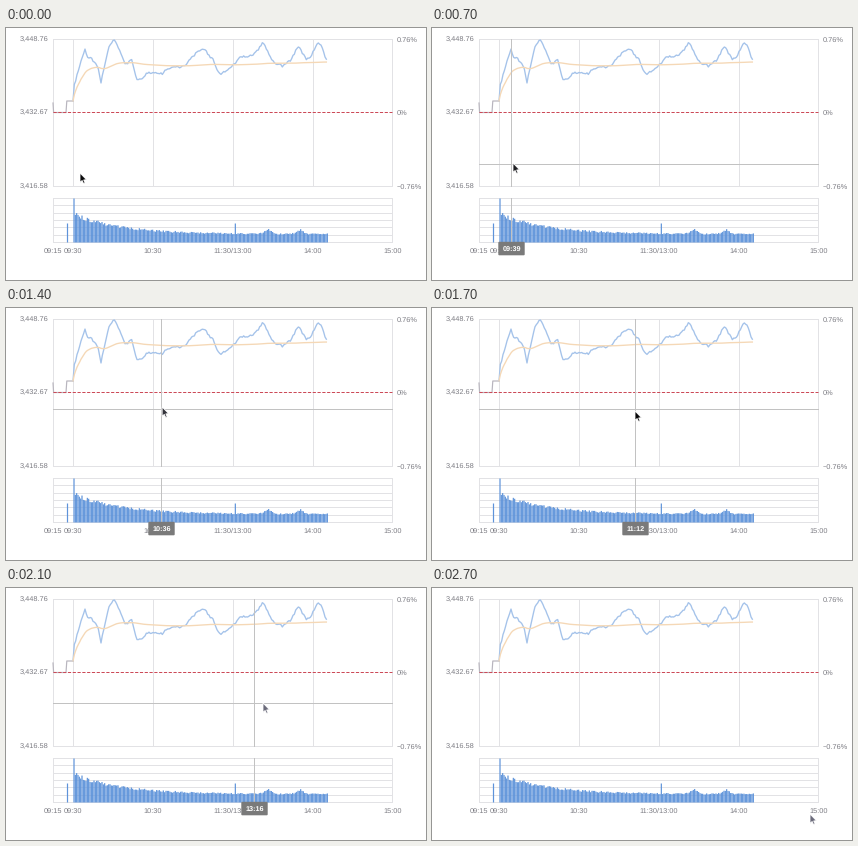
Recreate the animation shown at these times as a matplotlib script. Size 420x252 px, loop 2.8 s.

```python
import matplotlib.pyplot as plt
import numpy as np
from matplotlib.animation import FuncAnimation
from matplotlib.patches import FancyBboxPatch, Polygon

W, H, DPI = 420, 252, 100
PX = 72 / DPI                      # points per pixel
FRAMES, STEP = 28, 100
LEFT, RIGHT = 47.5, 386.5
TOP, MID, BOTTOM = 11.5, 84.5, 158.5
VOL_TOP, VOL_BOTTOM = 170.5, 214.5
OPEN, LAST = 67, 320
MINUTE = 4 / 3                     # pixels per trading minute
GRID, TEXT, CROSS = "#e2e2e5", "#7b7b82", "#c2c2c2"

plt.rcParams["font.family"] = "Liberation Sans"
plt.rcParams["text.hinting"] = "none"
fig = plt.figure(figsize=(W / DPI, H / DPI), dpi=DPI, facecolor="white")
ax = fig.add_axes([0, 0, 1, 1])
ax.set_xlim(0, W)
ax.set_ylim(H, 0)
ax.axis("off")


def line(xs, ys, color, width=1.0, **kw):
    return ax.plot(xs, ys, color=color, lw=width * PX, snap=False, **kw)[0]


def label(x, y, s, align="center", **kw):
    style = dict(color=TEXT, fontsize=7.4 * PX, zorder=5) | kw
    return ax.text(x, y, s, ha=align, va="center_baseline", **style)


def draw_grid():
    rows = np.floor(np.linspace(VOL_TOP, VOL_BOTTOM, 7)) + 0.5
    for y in (TOP, BOTTOM, *rows):
        line([LEFT, RIGHT], [y, y], GRID, zorder=1)
    for x in (LEFT, 67.5, 147.5, 227.5, 307.5, RIGHT):
        line([x, x], [TOP, BOTTOM], GRID, zorder=1)
    for x in (LEFT, RIGHT):
        line([x, x], [VOL_TOP, VOL_BOTTOM], GRID, zorder=1)
    for y, price, change in ((TOP, "3,448.76", "0.76%"),
                             (MID, "3,432.67", "0%"),
                             (BOTTOM, "3,416.58", "\u22120.76%")):
        label(42.2, y - 0.6, price, "right")
        label(391, y - 0.6, change, "left")
    for x, clock in ((47, "09:15"), (67, "09:30"), (147, "10:30"),
                     (227, "11:30/13:00"), (307, "14:00"), (386.5, "15:00")):
        label(x, 222.4, clock)


def volumes(xs, rng):
    """Opening rush that decays, two later swells and a reopening spike."""
    swell = sum(4 * np.exp(-((xs - c) / 5) ** 2) for c in (261, 293))
    bars = (8.5 + 20 * np.exp(-(xs - OPEN) / 46) + swell)
    bars *= rng.uniform(0.9, 1.08, len(xs))
    bars[0] = VOL_BOTTOM - VOL_TOP
    bars[np.abs(xs - 228).argmin()] = 19
    return bars


def prices(xs, rng):
    """Main turning points joined by a seeded jitter."""
    turns = np.array([
        (67, 73), (68, 58), (74, 36), (79, 22), (82, 31), (85, 30), (92, 39),
        (95, 54), (103, 19), (108, 11), (120, 37), (125, 30), (131, 52),
        (136, 51), (141, 45), (157, 46), (160, 41), (178, 38), (193, 22),
        (198, 21), (207, 32), (214, 47), (226, 38), (234, 30), (249, 26),
        (257, 14), (268, 35), (277, 38), (285, 32), (292, 18), (300, 31),
        (305, 28), (312, 15), (315, 16), (320, 31)])
    ys = np.interp(xs, *turns.T)
    ys[1:] += rng.uniform(-1.2, 1.2, len(xs) - 1)
    return np.maximum(ys, TOP - 0.5)


def draw_market(rng):
    xs = np.arange(OPEN, LAST + 0.5, MINUTE)
    ys, bars = prices(xs, rng), volumes(xs, rng)
    mean = np.cumsum(ys * bars) / np.cumsum(bars)

    line([47, 47.6, 60, 60.8, OPEN], [75, MID, MID, 73, 73], "#b8b5be", 1.2,
         zorder=3)
    line(xs, ys, "#a5c3ea", 1.35, zorder=3)
    line(xs, mean, "#f5d8b6", 1.35, zorder=3)
    line([LEFT, RIGHT], [MID, MID], "#cc4a58", dashes=(3.2, 1.6), zorder=4)

    xs, bars = np.append(xs + 1, 61.5), np.append(bars, 19)
    ax.vlines(xs, VOL_BOTTOM - bars, VOL_BOTTOM, color="#5e93da",
              lw=1.2 * PX, zorder=2, snap=False)


def glide(t, keys):
    """Smooth values through timed keys, never overshooting them."""
    ts, *tracks = np.array(keys, float).T
    i = int(np.clip(np.searchsorted(ts, t, "right") - 1, 0, len(ts) - 2))
    d = ts[i + 1] - ts[i]
    u = (t - ts[i]) / d
    out = []
    for v in tracks:
        slope = np.diff(v) / np.diff(ts)
        m = np.gradient(v, ts)
        m[1:-1][slope[:-1] * slope[1:] <= 0] = 0
        out.append((1 + 2 * u) * (1 - u) ** 2 * v[i]
                   + u * (1 - u) ** 2 * d * m[i]
                   + u * u * (3 - 2 * u) * v[i + 1]
                   + u * u * (u - 1) * d * m[i + 1])
    return out


def clock(minute):
    total = 555 + minute if minute <= 135 else 780 + minute - 135
    return f"{total // 60:02d}:{total % 60:02d}"


# time, pointer x and y, trailing crosshair x and y, pointer shade
PATH = [(0, 74, 145, 76, 145, 0.04), (400, 51, 148, 51, 148.5, 0.03),
        (700, 81, 135, 79, 136, 0.12), (1100, 114, 98, 111, 101, 0.38),
        (1700, 203, 103, 203, 101, 0.03), (2100, 257, 115, 248.3, 115, 0.42),
        (2700, 378, 226, 372, 218, 0.42)]
ARROW = 1.12 * np.array([(0, 0), (0, 8.4), (1.9, 6.7), (3.2, 9.5),
                         (4.5, 8.9), (3.3, 6.2), (5.9, 6.1)])

draw_grid()
draw_market(np.random.default_rng(8))

cross_h = line([], [], CROSS, zorder=6)
cross_v = [line([], [], CROSS, zorder=6) for _ in range(2)]
tag = FancyBboxPatch((0, 0), 1, 1, boxstyle="round,pad=0,rounding_size=1",
                     fc="#7a7a7a", ec="none", zorder=7)
ax.add_patch(tag)
tag_text = label(0, 220.4, "", color="white", weight="bold", zorder=8,
                 fontsize=7.3 * PX)
pointer = Polygon(ARROW, closed=True, ec="white", lw=0.8 * PX, zorder=9,
                  joinstyle="round")
ax.add_patch(pointer)


def update(frame):
    px, py, x, y, shade = glide(frame * STEP, PATH)
    pointer.set_xy(ARROW + (px, py))
    pointer.set_facecolor((shade, shade, shade * 1.15))

    shown = 0 < frame < FRAMES - 1
    for part in (cross_h, *cross_v, tag, tag_text):
        part.set_visible(shown)
    if shown:
        minute = round((x - 47) / MINUTE)
        x = round(47 + minute * MINUTE) + 0.5
        y = np.floor(y) + 0.5
        cross_h.set_data([LEFT, RIGHT], [y, y])
        cross_h.set_visible(y <= BOTTOM or VOL_TOP <= y <= VOL_BOTTOM)
        cross_v[0].set_data([x, x], [TOP, BOTTOM])
        cross_v[1].set_data([x, x], [VOL_TOP, VOL_BOTTOM])
        tag.set_bounds(x - 13.2, 213.8, 26.4, 13.5)
        tag_text.set_x(x)
        tag_text.set_text(clock(minute))
    return pointer, cross_h, *cross_v, tag, tag_text


anim = FuncAnimation(fig, update, frames=FRAMES, interval=STEP, repeat=True,
                     repeat_delay=0, init_func=lambda: update(0), blit=False)
plt.show()
```
